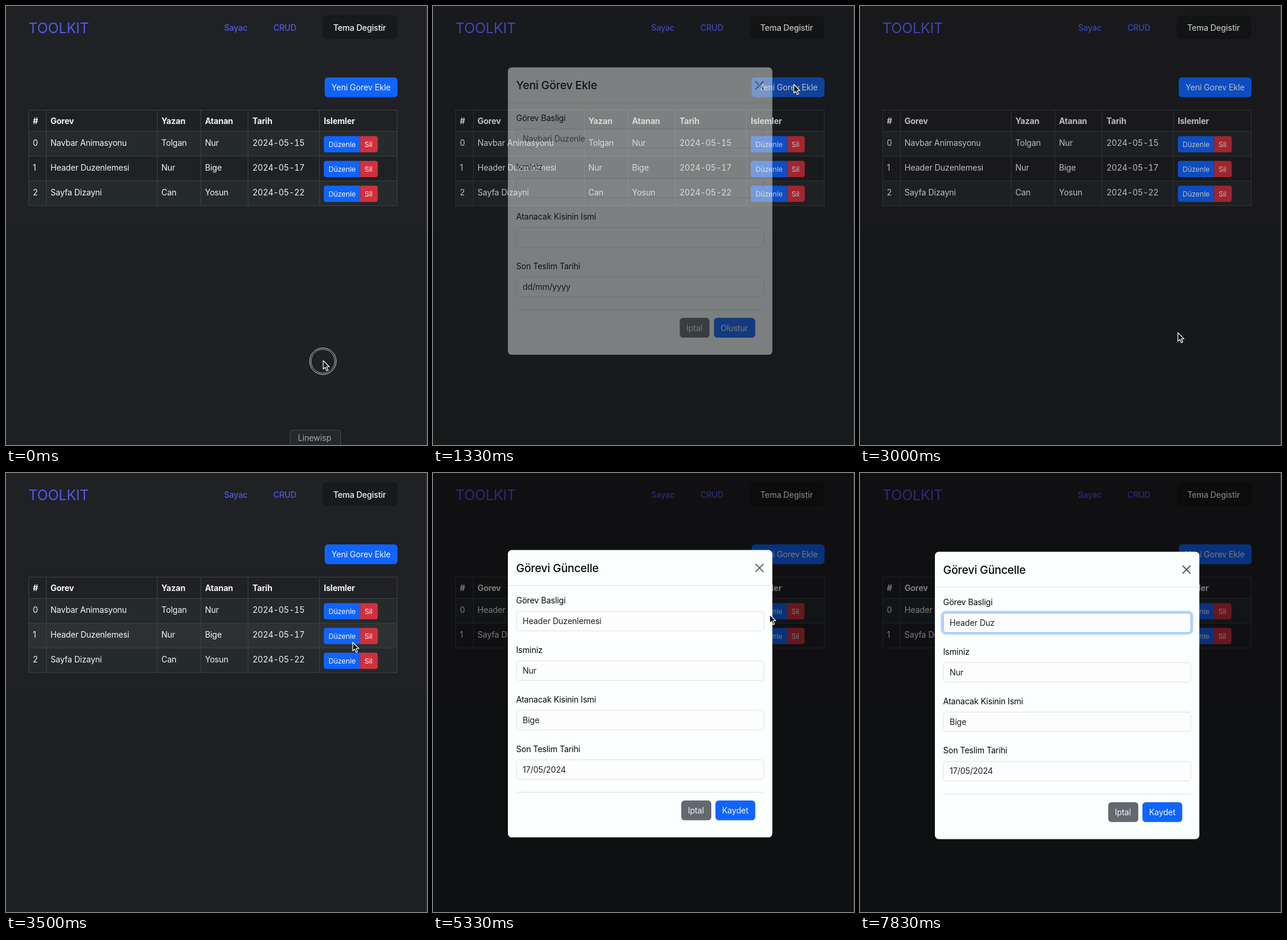
Write an HTML page that moves like this. It is 714 px wide and 744 px high and loops after 8000 ms.

```html
<!DOCTYPE html>
<html lang="tr">
<head>
<meta charset="utf-8">
<title>Toolkit</title>
<style>
  html, body { margin: 0; width: 100%; height: 100%; overflow: hidden; background: #1d2123; }
  svg { display: block; width: 714px; height: 744px; }
  text { font: 13.9px Inter, "Open Sans", sans-serif; letter-spacing: -.012em; white-space: pre; }
  .brand { font-size: 24.3px; }
  .medium { font-weight: 500; }
  .bold { font-weight: 700; }
  .small { font-size: 12.2px; }
  .title { font-size: 18.9px; font-weight: 500; }
  .date { font-variant-numeric: tabular-nums; }
</style>
</head>
<body>
<svg id="stage" viewBox="0 0 714 744"></svg>
<script>
const LOOP = 8000, STEP = 1000 / 6;
const BLUE = '#1064fd', BLUE_HOVER = '#1254c8', RED = '#d0313d', LINK = '#5457e6';
const LIGHT = '#f3f4f5', PAGE = '#202125', BORDER = '#3c4043';

const TASKS = [
  ['Navbar Animasyonu', 'Tolgan', 'Nur', '2024-05-15'],
  ['Header Duzenlemesi', 'Nur', 'Bige', '2024-05-17'],
  ['Sayfa Dizayni', 'Can', 'Yosun', '2024-05-22'],
];
const HEADERS = ['#', 'Gorev', 'Yazan', 'Atanan', 'Tarih', 'Islemler'];

// Pointer stops: time, x, y
const POINTER = [
  [0, 538, 601], [250, 538, 601], [1000, 612, 133], [1360, 612, 133], [2000, 522, 647],
  [2750, 522, 647], [3500, 588, 287], [4100, 612, 234], [4450, 612, 234],
  [4830, 573, 236], [5100, 573, 236], [5330, 571, 240], [5450, 571, 240], [6100, 330, 252],
];
const PRESSES = [[-50, 120], [1130, 1260], [2480, 2620], [4200, 4330], [4860, 5090], [6250, 6380]];
const DELETE_AT = 4330, FOCUS_AT = 6250, ERASE_FROM = 7090, ERASE_TO = 7800;
const ADD_MODAL = { open: 1267, close: 2620 }, EDIT_MODAL = { open: 5093, close: Infinity };

const clamp = v => Math.max(0, Math.min(1, v));
const progress = (t, from, duration) => clamp((t - from) / duration);
const easeOut = p => 1 - (1 - p) ** 1.7;
const smooth = p => p * p * (3 - 2 * p);

const text = (x, y, s, fill = LIGHT, cls = '') =>
  `<text x="${x}" y="${y}" fill="${fill}" class="${cls}">${s}</text>`;
const rect = (x, y, w, h, fill, r = 0, extra = '') =>
  `<rect x="${x}" y="${y}" width="${w}" height="${h}" rx="${r}" fill="${fill}" ${extra}/>`;
const path = (d, stroke, width = 1, fill = 'none') =>
  `<path d="${d}" stroke="${stroke}" stroke-width="${width}" fill="${fill}" stroke-linejoin="round"/>`;

function pointerAt(t) {
  const i = POINTER.findIndex(stop => stop[0] > t);
  if (i < 0) return POINTER.at(-1).slice(1);
  const [t0, x0, y0] = POINTER[i - 1], [t1, x1, y1] = POINTER[i];
  const p = smooth((t - t0) / (t1 - t0));
  return [x0 + (x1 - x0) * p, y0 + (y1 - y0) * p];
}

function hoverAt(x, y, rowCount) {
  const inTable = x > 38 && x < 664 && y > 212.5 && y < 212.5 + 42 * rowCount;
  const row = inTable ? Math.floor((y - 212.5) / 42) : -1;
  const inButton = inTable && (y - 212.5) % 42 > 8 && (y - 212.5) % 42 < 32;
  return {
    row,
    add: x > 541 && x < 664 && y > 121 && y < 154.5,
    edit: inButton && x > 539 && x < 600,
    remove: inButton && x >= 600 && x < 630,
  };
}

function header(hover) {
  return rect(0, 0, 714, 376, PAGE)
    + text(38, 46, 'TOOLKIT', LINK, 'brand')
    + text(370, 41.5, 'Sayac', LINK, 'medium')
    + text(453.5, 41.5, 'CRUD', LINK, 'medium')
    + rect(537, 16, 127, 40, '#18191a', 7)
    + text(555, 41.5, 'Tema Degistir', LIGHT, 'medium')
    + rect(540.5, 121, 123.5, 33.5, hover.add ? BLUE_HOVER : BLUE, 5.5)
    + text(552, 143, 'Yeni Gorev Ekle');
}

function actions(x, y, hover) {
  const right = x + 61.5;
  return path(`M${right} ${y}H${x + 4}q-4 0-4 4v19.5q0 4 4 4H${right}z`, 'none', 0, hover.edit ? BLUE_HOVER : BLUE)
    + path(`M${right} ${y}h26q4 0 4 4v19.5q0 4-4 4h-26z`, 'none', 0, hover.remove ? '#b32a35' : RED)
    + text(x + 8, y + 18.5, 'Düzenle', LIGHT, 'small')
    + text(x + 69, y + 18.5, 'Sil', LIGHT, 'small');
}

function table(tasks, hover) {
  const cols = tasks.length > 2 ? [38, 68, 256, 330, 410.5, 531.5] : [38, 68, 257, 328.5, 409.5, 531];
  const bottom = 212.5 + 42 * tasks.length;
  let out = '', lines = `M38 176.5H664M38 212.5H664M663.5 176.5V${bottom}`;
  HEADERS.forEach((name, i) => {
    out += text(cols[i] + 7.5, 200, name, LIGHT, 'bold');
    lines += `M${Math.floor(cols[i]) + .5} 176.5V${bottom}`;
  });
  tasks.forEach((task, row) => {
    const y = 212.5 + 42 * row, hovered = hover.row === row;
    out += rect(38, y, 626, 42, hovered ? '#2e3033' : row % 2 ? PAGE : '#252a2c');
    [row, ...task].forEach((value, i) => {
      out += text(cols[i] + 7.5, y + 24, value, LIGHT, i === 4 ? 'date' : '');
    });
    out += actions(cols[5] + 7.5, y + 8, hovered ? hover : {});
    lines += `M38 ${y + 42}H664`;
  });
  return out + path(lines, BORDER);
}

function dialog(t, timing, content) {
  const opening = t < timing.close;
  const fade = progress(t, opening ? timing.open : timing.close, 150);
  const slide = easeOut(progress(t, opening ? timing.open : timing.close, 300));
  const dim = Math.min(progress(t, timing.open, 150), 1 - progress(t, timing.close + 300, 150));
  if (!dim) return '';

  const { title, values, placeholder, buttons, focus = 0 } = content;
  const labels = ['Görev Basligi', 'Isminiz', 'Atanacak Kisinin Ismi', 'Son Teslim Tarihi'];
  let body = rect(127, 133.5, 448.5, 487, '#fbfffd', 6.5)
    + text(141, 170.5, title, '#08090a', 'title')
    + path('M547 157l13.5 13.5M560.5 157L547 170.5', '#565a5c', 1.8)
    + path('M127 193.5H575.5M141 544H561', '#dfe0e5');
  labels.forEach((label, i) => {
    const y = 237 + 83.8 * i;
    body += text(141, y - 13, label, '#08090a');
    if (i === 0 && focus)
      body += rect(139, y - 1.5, 424, 36.5, 'none', 6.5, `stroke="#b9d5fd" stroke-width="4" opacity="${focus}"`);
    body += rect(141.5, y + .5, 419.5, 33, '#fdfdff', 5, `stroke="${i === 0 && focus ? '#86b7fe' : '#e2dfe7'}"`)
      + text(152, y + 22, values[i], i === 0 && placeholder ? '#5a6066' : '#1d2125');
  });
  buttons.forEach(([label, x, width, fill]) => {
    body += rect(x, 558, width, 33.5, fill, 5.5) + text(x + 11.2, 580, label);
  });
  const offset = -45 * (opening ? 1 - slide : slide);
  return rect(0, 0, 714, 744, '#000', 0, `opacity="${dim * .5}"`)
    + `<g opacity="${opening ? fade : 1 - fade}" transform="translate(0 ${offset})">${body}</g>`;
}

function addDialog(t) {
  return dialog(t, ADD_MODAL, {
    title: 'Yeni Görev Ekle', placeholder: true,
    values: ['Navbari Duzenle', '', '', 'dd/mm/yyyy'],
    buttons: [['Iptal', 418.5, 50.5, '#62696f'], ['Olustur', 476.5, 70, BLUE]],
  });
}

function editDialog(t) {
  const [name, author, assignee] = TASKS[1];
  const erased = Math.ceil(8 * progress(t, ERASE_FROM, ERASE_TO - ERASE_FROM));
  return dialog(t, EDIT_MODAL, {
    title: 'Görevi Güncelle', focus: progress(t, FOCUS_AT, 150),
    values: [name.slice(0, name.length - erased), author, assignee, '17/05/2024'],
    buttons: [['Iptal', 421, 51, '#62696f'], ['Kaydet', 479, 67.5, BLUE]],
  });
}

function pointer(t, x, y, hand) {
  if (t >= ERASE_FROM) return '';
  const press = PRESSES.find(([down, up]) => t >= down && t < up);
  let out = '';
  if (press) {
    const r = Math.min(31, 18 + .09 * (t - press[0]));
    const ring = (radius, color, width) =>
      `<circle cx="${x - .5}" cy="${y + 1}" r="${radius}" fill="none" stroke="${color}" stroke-width="${width}"/>`;
    out = ring(r - 1.2, '#17191b', 2.4) + ring(r, '#d8dadb', 1) + ring(r - 2.4, '#b4b6b8', 1);
  }
  const shape = hand
    ? path('M-1 1Q1-1 2 1L3 6Q5 5 5.5 6.5Q7.5 5.5 8 7.3Q10 6.7 10 9V12L8 16H1L-4 10Q-4 8-2 8.5L0 10Z', '#17191b', 1, '#fff')
    : path('M0 0V14.5L3.3 11.4L5.8 17L8.2 16L5.8 10.5H10.4Z', '#fff', 1.2, '#101112');
  return out + `<g transform="translate(${x} ${y})">${shape}</g>`;
}

function tooltip() {
  return rect(482, 719, 85.5, 30, '#25272a', 4, 'stroke="#48494c"')
    + text(495, 737, 'Linewisp', '#a3a5a7');
}

function scene(t) {
  const [x, y] = pointerAt(t);
  const tasks = t < DELETE_AT ? TASKS : TASKS.slice(1);
  const covered = [ADD_MODAL, EDIT_MODAL].some(m => t >= m.open && t < m.close + 300);
  const hover = covered ? { row: -1, add: t < 1500 && t > ADD_MODAL.open } : hoverAt(x, y, tasks.length);
  const hand = !covered && (hover.add || hover.edit || hover.remove);
  return header(hover) + table(tasks, hover)
    + (t < STEP / 2 ? tooltip() : '')
    + addDialog(t) + editDialog(t)
    + rect(713, 0, 1, 744, '#3a3c3f')
    + pointer(t, x, y, hand);
}

const stage = document.getElementById('stage');
const start = performance.now();
let shown = -1;
function tick() {
  const step = Math.floor(((performance.now() - start) % LOOP + 5) / STEP) % 48;
  if (step !== shown) {
    shown = step;
    stage.innerHTML = scene(step * STEP);
  }
  requestAnimationFrame(tick);
}
tick();
</script>
</body>
</html>
```
